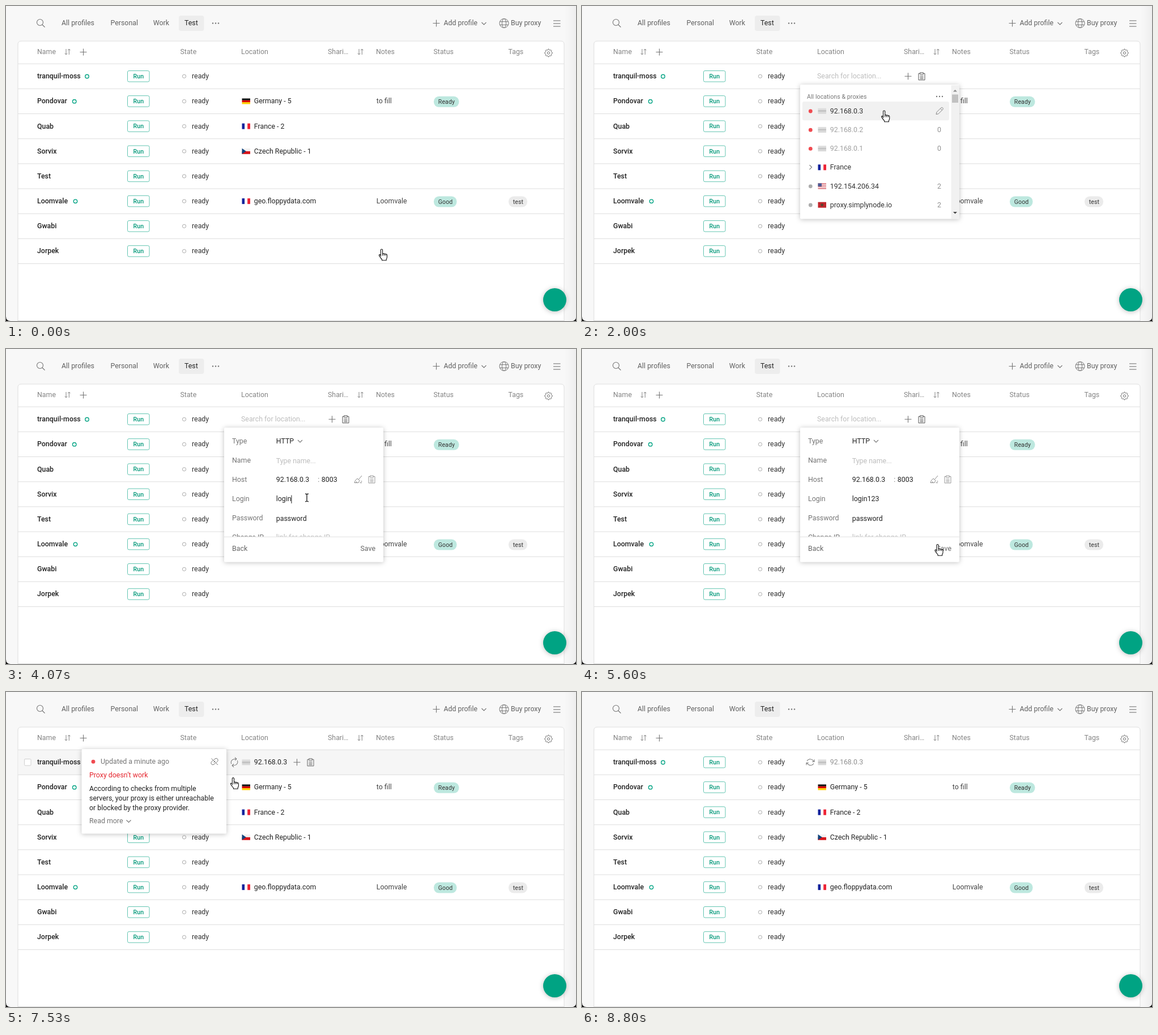
Write an HTML page that moves like this. It is 1006x557 px and loops after 8870 ms.

```html
<!DOCTYPE html>
<html lang="en">
<head>
<title>Profiles</title>
<style>
  html, body { margin: 0; width: 100%; height: 100%; overflow: hidden; background: #000; }
  svg { display: block; width: 1006px; height: 557px; }
  text { font: 12.37px Roboto, Arial, sans-serif; white-space: pre; }
  .small { font-size: 10.6px; letter-spacing: .06px; }
  .bold { font-weight: 500; }
  .shadow { filter: drop-shadow(0 1px 4px rgba(0, 0, 0, .25)); }
</style>
</head>
<body>
<svg id="stage" viewBox="0 0 1006 557"></svg>
<script>
const LOOP = 8870;
const GREEN = '#00a383', INK = '#222', GREY = '#757575', PALE = '#bdbdbd', RED = '#f04a50';
const ROW_TOP = 102.2, ROW_H = 44.17;
const stage = document.getElementById('stage');

function el(parent, tag, attrs, content) {
  const node = document.createElementNS('http://www.w3.org/2000/svg', tag);
  for (const k in attrs) node.setAttribute(k, attrs[k]);
  if (content !== undefined) node.textContent = content;
  return parent.appendChild(node);
}
const group = (p, attrs = {}) => el(p, 'g', attrs);
const rect = (p, x, y, width, height, fill, more) => el(p, 'rect', { x, y, width, height, fill, ...more });
const dot = (p, cx, cy, r, fill) => el(p, 'circle', { cx, cy, r, fill });
const ring = (p, cx, cy, r, stroke, w = 1.2) =>
  el(p, 'circle', { cx, cy, r, stroke, fill: 'none', 'stroke-width': w });
const line = (p, d, stroke = GREY, w = 1.1, more) =>
  el(p, 'path', { d, stroke, fill: 'none', 'stroke-width': w, ...more });
// y is the middle of the text line
const text = (p, x, y, str, fill = INK, cls = '') =>
  el(p, 'text', { x, y: y + (cls.includes('small') ? 3.8 : 4.3), fill, class: cls }, str);
const show = (node, on) => node.setAttribute('visibility', on ? 'visible' : 'hidden');

// Icons
const plus = (p, x, y, r = 6, c = GREY) => line(p, `M${x - r} ${y}h${2 * r}M${x} ${y - r}v${2 * r}`, c);
const chevron = (p, x, y, c = GREY) => line(p, `M${x - 4} ${y - 2}l4 4 4-4`, c);
const dots = (p, x, y, c = GREY) => [-5, 0, 5].forEach(d => dot(p, x + d, y, 1.2, c));
function clipboard(p, x, y, c = '#666') {
  line(p, `M${x - 3} ${y - 5}h-2.5v11.5h11v-11.5h-2.5M${x - 2.8} ${y - 3.5}v-3h5.6v3zM${x - 3} ${y - .5}h6m-6 2.5h6m-6 2.3h6`, c, 1);
}
function sortIcon(p, x, y) {
  line(p, `M${x - 2.5} ${y - 5}v10m-2.2-2.4l2.2 2.4 2.2-2.4M${x + 2.8} ${y + 5}v-10m-2.2 2.4l2.2-2.4 2.2 2.4`, '#858585', 1);
}
function gear(p, x, y) {
  let d = '';
  for (let i = 0; i < 32; i++) {
    const a = (i - .5) * Math.PI / 16, r = i % 4 < 2 ? 6.9 : 5.3;
    d += `${i ? 'L' : 'M'}${x + r * Math.cos(a)} ${y + r * Math.sin(a)}`;
  }
  line(p, d + 'z', GREY, 1, { 'stroke-linejoin': 'round' });
  ring(p, x, y, 2.2, GREY, 1);
}

const flags = {
  de: ['#111', '#d80000', '#ffce00'],
  none: ['#dedede', '#c3c3c3', '#d9d9d9']
};
function flag(p, kind, cy) {
  const x = 416.5, y = cy - 5, w = 14.5, h = 10;
  if (flags[kind]) flags[kind].forEach((c, i) => rect(p, x, y + i * h / 3, w, h / 3, c));
  if (kind === 'fr') ['#10239c', '#fff', '#ee2436'].forEach((c, i) => rect(p, x + i * w / 3, y, w / 3, h, c));
  if (kind === 'cz') {
    rect(p, x, y, w, h / 2, '#f2f2f2');
    rect(p, x, y + 5, w, h / 2, '#d7141a');
    el(p, 'path', { d: `M${x} ${y}l7.2 5-7.2 5z`, fill: '#11457e' });
  }
  if (kind === 'us') {
    for (let i = 0; i < 7; i++) rect(p, x, y + i * h / 7, w, h / 7, i % 2 ? '#fff' : '#d2555f');
    rect(p, x, y, 6.5, 5.6, '#4b5a94');
  }
  if (kind === 'ma') {
    rect(p, x, y, w, h, '#c1272d');
    line(p, `M${x + 7.2} ${y + 2.5}l1.5 4.7-4-2.9h5l-4 2.9z`, '#3a4a2d', .8);
  }
}

// Page and header
const page = group(stage);
const fade = el(page, 'linearGradient', { id: 'edge' });
el(fade, 'stop', { offset: 0, 'stop-color': '#f8f8f8' });
el(fade, 'stop', { offset: 1, 'stop-color': '#eeeeee' });
el(page, 'path', { d: 'M0 0H1006V549q0 8-8 8H8q-8 0-8-8z', fill: '#f8f8f8' });
el(page, 'path', { d: 'M986 0H1006V549q0 8-8 8H986z', fill: 'url(#edge)' });

ring(page, 60, 29, 5.5, GREY, 1.1);
line(page, 'M64 33l4.5 4.5');
rect(page, 305, 17, 44.5, 27, '#ededed', { rx: 4 });
text(page, 98, 30, 'All profiles', '#616161');
text(page, 184.5, 30, 'Personal', '#616161');
text(page, 259.8, 30, 'Work', '#616161');
text(page, 315, 30, 'Test', INK);
dots(page, 370, 30.5);
plus(page, 759.5, 30.5);
text(page, 772.5, 30, 'Add profile', '#616161');
chevron(page, 843.5, 31);
ring(page, 879, 30.5, 8, GREY, 1);
el(page, 'ellipse', { cx: 879, cy: 30.5, rx: 3.6, ry: 8, fill: 'none', stroke: GREY });
line(page, 'M871.5 27.7h15m-15 5.6h15', GREY, 1);
text(page, 891, 30, 'Buy proxy', '#616161');
line(page, 'M966 26h12.5m-12.5 5h12.5m-12.5 5h12.5', '#666');

// Table
el(page, 'path', { d: 'M21 557V68q0-6 6-6H979q6 0 6 6V557', fill: '#fff', stroke: '#dedede' });
rect(page, 21, 556, 964, 1, '#d8d8d8');
[['Name', 55], ['State', 307.5], ['Location', 415], ['Shari\u2026', 568], ['Notes', 653], ['Status', 754.5], ['Tags', 886.5]]
  .forEach(([s, x]) => text(page, x, 81, s, '#858585'));
sortIcon(page, 108.5, 81);
plus(page, 136.5, 81.5);
sortIcon(page, 625.5, 81);
gear(page, 957.5, 83);

function badge(p, x, cy, w, str, fill) {
  rect(p, x, cy - 9.5, w, 19, fill, { rx: 9 });
  text(p, x + 7.8, cy, str, '#333', 'small');
}

const people = [
  { name: 'tranquil-moss', mark: 143 },
  { name: 'Pondovar', mark: 120.7, flag: 'de', place: 'Germany - 5', end: 504, note: 'to fill', status: 'Ready', wide: 44.5 },
  { name: 'Quab', flag: 'fr', place: 'France - 2', end: 491.5 },
  { name: 'Sorvix', flag: 'cz', place: 'Czech Republic - 1', end: 538.5 },
  { name: 'Test' },
  { name: 'Loomvale', mark: 122.5, flag: 'fr', place: 'geo.floppydata.com', end: 547, note: 'Loomvale', status: 'Good', wide: 40.5, tag: 'test' },
  { name: 'Gwabi' },
  { name: 'Jorpek' }
];

const rows = people.map((r, i) => {
  const top = ROW_TOP + ROW_H * i, y = top + 21.8;
  const hover = group(page), g = group(page);
  rect(hover, 21.5, top, 963, ROW_H, '#f6f6f6');
  rect(hover, 32.5, y - 5.5, 11.5, 11.5, '#fff', { stroke: '#cfcfcf', rx: 1.5 });
  dots(hover, 273.7, y + .5);
  text(g, 55, y, r.name, INK, 'bold');
  if (r.mark) ring(g, r.mark, y + .5, 3.2, GREEN, 1.4);
  rect(g, 214.5, y - 9.5, 38.5, 19.5, '#fff', { rx: 2.5, stroke: '#62c5b1' });
  text(g, 224.6, y + .2, 'Run', '#009879', 'small bold');
  ring(g, 314.5, y + .3, 3.1, '#a8a8a8', 1);
  text(g, 328, y, 'ready', '#333');
  if (r.place) {
    flag(g, r.flag, y + .3);
    text(g, 437.8, y, r.place);
    dot(hover, 403.3, y + .3, 3.4, GREEN);
    plus(hover, r.end + 16, y + .3);
    clipboard(hover, r.end + 40, y + .3);
  }
  if (r.note) text(g, 653.8, y, r.note, '#444');
  if (r.status) badge(g, 755, y + 1.2, r.wide, r.status, '#bde8df');
  if (r.tag) badge(g, 887, y + 1.2, 33, r.tag, '#ebebeb');
  rect(page, 21, top - .5, 964, 1, '#dedede');
  return hover;
});
rect(page, 21, ROW_TOP + ROW_H * 8 - .5, 964, 1, '#dedede');

// First row: search field, then the chosen proxy
const search = group(stage);
text(search, 415, 123.7, 'Search for location...', PALE);
plus(search, 575.5, 124.3);
clipboard(search, 599.5, 124.3, '#555');

const proxy = group(stage);
const spinner = group(proxy);
line(spinner, 'M7 -5V-1H3M-7 5V1H-3M-5.9 -2A6.1 6.1 0 0 1 3.7 -4L7 -1M-7 1L-3.7 4A6.1 6.1 0 0 0 5.9 2', GREY, 1);
flag(proxy, 'none', 124.3);
const proxyText = text(proxy, 437.8, 124, '92.168.0.3');
const proxyTools = group(proxy);
plus(proxyTools, 513.5, 124.3);
clipboard(proxyTools, 537.5, 124.3);

function panel(x, y, w, h) {
  const g = group(stage);
  rect(g, x, y, w, h, '#fff', { rx: 2, class: 'shadow' });
  return g;
}

// Location list
const list = panel(385, 139, 281, 237.5);
text(list, 397, 160, 'All locations & proxies', GREY, 'small');
dots(list, 631, 160);
const pick = group(list);
rect(pick, 389, 169, 259, 33.2, '#f1f1f1', { rx: 3 });
line(pick, 'M625 191.5l1-3.8 8-8q1.4-.8 2.6.4t.4 2.6l-8 8zM632.5 181.2l2.9 2.9', '#858585', 1);
const items = [
  ['92.168.0.3', 'none', RED, '0'], ['92.168.0.2', 'none', RED, '0'], ['92.168.0.1', 'none', RED, '0'],
  ['France', 'fr'], ['192.154.206.34', 'us', '#adadad', '2'], ['proxy.simplynode.io', 'ma', '#adadad', '2']
].map(([name, kind, mark, count], i) => {
  const y = 185.5 + i * 33.2;
  if (mark) dot(list, 403.3, y + .5, 3.4, mark);
  else line(list, `M401.5 ${y - 4}l4 4-4 4`);
  flag(list, kind, y + .2);
  const label = text(list, 437.8, y, name, mark === RED ? '#a0a0a0' : '#333');
  return { label, count: count && text(list, 627, y, count, '#909090') };
});
rect(list, 651.5, 140, 14.5, 236, '#f1f1f1');
rect(list, 653, 156.5, 11, 14.5, '#c1c1c1');
el(list, 'path', { d: 'M655 151.5l3.5-3.5 3.5 3.5z', fill: '#8a8a8a' });
el(list, 'path', { d: 'M655 364l3.5 3.5 3.5-3.5z', fill: '#444' });

// Proxy form
const form = panel(385, 139, 281, 237.5);
['Type', 'Name', 'Host', 'Login', 'Password', 'Change IP']
  .forEach((s, i) => text(form, 399, 162.5 + i * 34.05, s, GREY));
text(form, 476.8, 162.5, 'HTTP');
chevron(form, 519, 163);
text(form, 476.8, 197.5, 'Type name...', PALE);
text(form, 476.8, 230.5, '92.168.0.3');
text(form, 550.3, 230.2, ':', GREY);
text(form, 556.8, 230.5, '8003');
line(form, 'M628 224l-5.5 6.5M615 236.5q1-5 5-7.5l4 3.5-2 4zM618 236.5l1-2.5m5.5 2.5h3.5m-2-2.5h2.5', '#8a8a8a', 1);
clipboard(form, 645.5, 230.5, '#999');
const login = text(form, 476.8, 265, 'login');
const caret = rect(form, 503.5, 258.5, 1, 14.5, INK);
text(form, 476.8, 299.3, 'password');
text(form, 476.8, 333, 'link for change IP', PALE);
rect(form, 385, 332, 281, 44.5, '#fff', { rx: 2 });
rect(form, 385, 331.7, 281, 1, '#e2e2e2');
text(form, 399, 353, 'Back', '#666');
text(form, 625.5, 353, 'Save', '#666');

// Proxy report
const tip = panel(133.5, 101, 255.5, 149.5);
dot(tip, 154, 123.2, 3.4, RED);
text(tip, 167, 122.5, 'Updated a minute ago', GREY);
line(tip, 'M366.5 120.5l2.5-2.5q2.3-1.6 4.2.3t.3 4.2l-2.5 2.5M369.5 125.5l-2.5 2.5q-2.3 1.6-4.2-.3t-.3-4.2l2.5-2.5M366.5 124.7l3-3M362.5 117.5l11.5 11.5', GREY, 1);
text(tip, 147, 146.3, 'Proxy doesn\u2019t work', '#e5252e');
['According to checks from multiple', 'servers, your proxy is either unreachable', 'or blocked by the proxy provider.']
  .forEach((s, i) => text(tip, 147, 170.2 + i * 17, s));
text(tip, 147, 228, 'Read more', GREY);
chevron(tip, 216.5, 228.5);

// Chat button
el(stage, 'circle', { cx: 968.5, cy: 519.5, r: 20.5, fill: GREEN, class: 'shadow' });

// Pointer
const pointer = group(stage);
const shape = (d, more) => el(pointer, 'path', { d, fill: '#fff', stroke: '#111', 'stroke-width': 1.1, 'stroke-linejoin': 'round', ...more });
const shapes = {
  hand: shape('M-1.6 12.5V1.6a1.6 1.6 0 0 1 3.2 0V8q1.4-1 2.8.3 1.5-.8 2.7.6 2.2-.6 2.4 1.6v3.5q0 2-1.3 3.6V19.7H.5V18Q-1.5 16-4.3 11.6q-.8-1.8.8-2 1 0 1.9 1.5zM1.6 8v3.5M4.4 8.3v3.2M7.1 8.9v2.6'),
  arrow: shape('M0 0V14.5L3.4 11.3 5.7 16.3 7.9 15.3 5.7 10.4H10.2z'),
  beam: shape('M-3-6.8q2.5 0 3 1 .5-1 3-1M0-5.8v11.6M-3 6.8q2.5 0 3-1 .5 1 3 1', { fill: 'none', 'stroke-width': 1.3 })
};

const path = [
  [0, 663, 430], [340, 663, 430], [870, 444, 147], [1130, 447, 126], [1670, 447, 126],
  [2000, 533, 185], [2530, 627, 184], [3070, 627, 184], [3800, 531, 263], [5140, 531, 263],
  [5730, 641, 357], [6010, 641, 357], [6600, 595, 290], [6930, 500, 195], [7130, 404, 122],
  [7460, 404, 122], [7530, 401, 151], [7870, 110, 527], [7930, 96, 545], [8000, 90, 560], [LOOP, 90, 560]
];
const slope = (i, k) => path[i] && path[i + 1] ? (path[i + 1][k] - path[i][k]) / (path[i + 1][0] - path[i][0]) : 0;
function speed(i, k) {
  const a = slope(i - 1, k), b = slope(i, k);
  return a * b > 0 ? 2 * a * b / (a + b) : 0;
}
// Monotone cubic through the path points
function along(t, k) {
  let i = 0;
  while (i < path.length - 2 && path[i + 1][0] <= t) i++;
  const span = path[i + 1][0] - path[i][0], u = (t - path[i][0]) / span, v = 1 - u;
  return path[i][k] * v * v * (1 + 2 * u) + path[i + 1][k] * u * u * (3 - 2 * u)
    + span * u * v * (speed(i, k) * v - speed(i + 1, k) * u);
}

function draw(t) {
  const between = (a, b) => t >= a && t < b;
  const x = along(t, 1), y = along(t, 2);
  const listOpen = between(1395, 2665), formOpen = between(2665, 6060), tipOpen = between(7195, 7565);
  const saved = t >= 6060;

  let over = Math.floor((y - ROW_TOP) / ROW_H);
  if (t < 405) over = -1;
  else if (listOpen || formOpen) over = y < 139 ? 0 : -1;
  else if (tipOpen) over = 0;
  rows.forEach((r, i) => show(r, i === over));

  show(search, !saved && (listOpen || formOpen || over === 0));
  show(proxy, saved);
  show(proxyTools, saved && over === 0);
  proxyText.setAttribute('fill', over === 0 ? INK : '#8f8f8f');
  spinner.setAttribute('transform', `translate(403 124.2) rotate(${(t - 8800) * .18})`);

  const onItem = listOpen && y > 169;
  show(list, listOpen);
  show(pick, onItem);
  items[0].label.setAttribute('fill', onItem ? '#333' : '#a0a0a0');
  show(items[0].count, listOpen && !onItem);

  const typed = [4660, 4795, 4865].filter(k => t >= k).length;
  show(form, formOpen);
  login.textContent = 'login' + '123'.slice(0, typed);
  caret.setAttribute('x', 503.4 + typed * 6.95);
  show(caret, formOpen && (between(4065, 4595) || between(4660, 5395) || t >= 5925));
  show(tip, tipOpen);

  let kind = (x > 385 && x < 565) || x > 645 ? 'hand' : 'arrow';
  if (listOpen) kind = 'hand';
  if (formOpen) kind = t < 3100 || y > 335 ? 'hand' : 'beam';
  for (const k in shapes) show(shapes[k], k === kind && t < 7995);
  pointer.setAttribute('transform', `translate(${x} ${y})`);
}

const start = performance.now();
function tick() {
  draw((performance.now() - start) % LOOP);
  requestAnimationFrame(tick);
}
tick();
</script>
</body>
</html>
```
